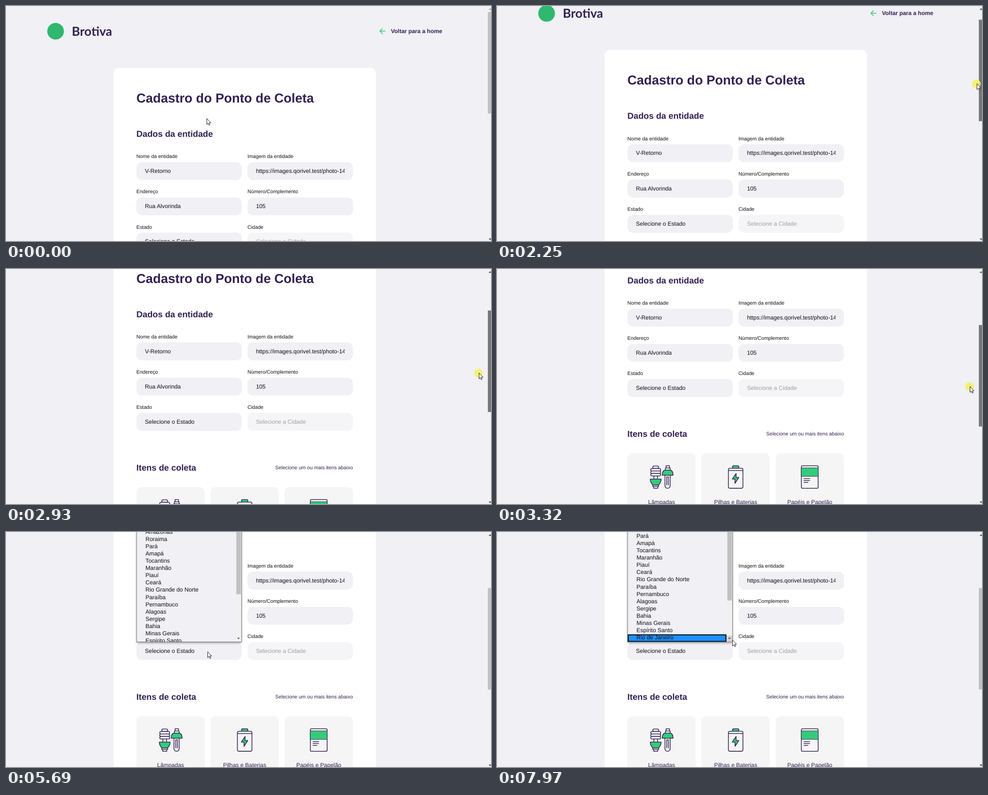
Recreate the animation shown at these times as an HTML page. Size 1076x521 px, loop 8000 ms.

```html
<!DOCTYPE html>
<html lang="pt-BR">
<head>
<meta charset="utf-8">
<title>Cadastro</title>
<style>
  html, body { margin: 0; width: 100%; height: 100%; overflow: hidden; background: #f0f0f5; }
  svg { display: block; width: 1076px; height: 521px; }
  text { font: 12.75px "Liberation Sans", Arial, sans-serif; fill: #111; text-rendering: geometricPrecision; }
  .brand { font: 700 27.6px Lato, sans-serif; fill: #322153; }
  .title { font-size: 28.7px; font-weight: 700; fill: #322153; }
  .section { font-size: 19.1px; font-weight: 700; fill: #322153; }
  .back { font-weight: 700; fill: #322153; }
  .label { font-size: 11.16px; }
  .hint { font-size: 11.16px; fill: #322153; text-anchor: end; }
  .item { fill: #322153; text-anchor: middle; }
  .off { fill: #9f9fa2; }
  .icon { fill: #f5f5f5; stroke: #322153; stroke-width: 1.6; stroke-linejoin: round; stroke-linecap: round; }
  .icon .g { fill: #34cb79; }
  #popup { filter: drop-shadow(0 2px 2px rgba(0, 0, 0, .35)); }
</style>
</head>
<body>
<svg viewBox="0 0 1076 521">
  <defs>
    <clipPath id="urlClip"><rect x="550" y="340" width="201" height="50"/></clipPath>
    <clipPath id="listClip"><rect x="290" width="220" height="243.5"/></clipPath>
  </defs>
  <rect width="1076" height="521" fill="#f0f0f5"/>

  <g id="page">
    <circle cx="110" cy="56" r="18.5" fill="#2fb86e"/>
    <text class="brand" x="146" y="65.7">Brotiva</text>
    <path d="M841 55.7H829.5m5.7-5.7l-5.7 5.7l5.7 5.7" fill="none" stroke="#34cb79" stroke-width="1.7" stroke-linecap="round" stroke-linejoin="round"/>
    <text class="back" x="854" y="59.8">Voltar para a home</text>
    <rect x="238.7" y="137" width="582" height="1000" rx="12.5" fill="#fff"/>
    <text class="title" x="289.3" y="214">Cadastro do Ponto de Coleta</text>
    <text class="section" x="289.3" y="290">Dados da entidade</text>
    <g id="fields"></g>
    <text class="section" x="289.3" y="630">Itens de coleta</text>
    <text class="hint" x="769.7" y="627.6">Selecione um ou mais itens abaixo</text>
    <g id="items"></g>
  </g>

  <rect x="1069" width="7" height="521" fill="#f1f1f1"/>
  <path id="up" d="M1070.5 8.5l3.5-3.5l3.5 3.5z"/>
  <path d="M1070.5 515.5l3.5 3.5l3.5-3.5z" fill="#505050"/>
  <rect id="thumb" x="1069" width="7" height="225"/>

  <g id="popup">
    <rect x="289.9" y="-6" width="232.6" height="249.7" fill="#f0f0f5" stroke="#767676"/>
    <g id="list" clip-path="url(#listClip)"></g>
    <rect x="510" width="12" height="243" fill="#f1f1f1"/>
    <rect id="listThumb" x="511" width="10" fill="#c1c1c1"/>
    <rect id="listDown" x="509.5" y="230" width="12.5" height="13.2" fill="#d2d2d2"/>
    <path d="M512.7 234.5h6l-3 3.3z" fill="#505050"/>
  </g>

  <g id="cursor">
    <circle id="press" cx="-.7" cy=".7" r="9.5" fill="#f7ee5e" opacity=".85"/>
    <path d="M.5 .5V13.6L3.4 10.8L5.4 15.4L7.4 14.5L5.4 10H9.4Z" fill="#fff" stroke="#111"/>
  </g>
</svg>
<script>
const LOOP = 8000, TICK = 77, ROW = 16.08;
const LEFT = 289.3, INSET = 19;
const $ = id => document.getElementById(id);
const set = (id, name, value) => $(id).setAttribute(name, value);
const show = (id, on) => { $(id).style.display = on ? '' : 'none'; };

const fields = [
  ['Nome da entidade', 'V-Retorno'], ['Imagem da entidade', 'https://images.qorivel.test/photo-1480'],
  ['Endereço', 'Rua Alvorinda'], ['Número/Complemento', '105'],
  ['Estado', 'Selecione o Estado'], ['Cidade', 'Selecione a Cidade']
];
$('fields').innerHTML = fields.map(([label, value], i) => {
  const off = value.endsWith('Cidade'), clip = value.startsWith('http');
  return `<g transform="translate(${LEFT + i % 2 * 246.4} ${337.2 + (i >> 1) * 78.2})">
    <text class="label">${label}</text>
    <rect y="9" width="234" height="39.7" rx="12.5" fill="${off ? '#f5f5f7' : '#f0f0f5'}"/></g>
    <g${clip ? ' clip-path="url(#urlClip)"' : ''}><text${off ? ' class="off"' : ''}
      x="${LEFT + INSET + i % 2 * 246.4}" y="${370 + (i >> 1) * 78.2}">${value}</text></g>`;
}).join('');

// Icons are drawn around a centre line at x = 0, with their top at y = 0.
const bar = (width, y) => `<rect x="${-13 - width / 2}" y="${y}" width="${width}" height="5.5" rx="2.7"/>`;
const items = {
  'Lâmpadas': bar(13, .5) + [6, 11.5, 17].map(y => bar(22, y)).join('') + `
    <path d="M-17 22.5v7m8 0v-7M-19.5 42.5h13v3.5h-13zm2 3.5h9v4h-9z"/>
    <path class="g" d="M-25 29.5h24q0 8-6 13h-12q-6-5-6-13z"/>
    <path d="M8.5 9.5v-4.5h10.5v4.5M10 5v-5h7.5v5M7.5 20.5v23.5a5.8 6 0 0 0 11.6 0v-23.5m-7.6 22v-18h3.7v18"/>
    <path class="g" d="M1.5 21q0-11.5 7.5-11.5h9q7.5 0 7.5 11.5z"/>`,
  'Pilhas e Baterias': `
    <rect class="g" x="-7" width="14" height="9" rx="2.5"/>
    <rect x="-16.1" y="5.5" width="32.2" height="44.3" rx="3"/>
    <path d="M-16 10.5h32"/>
    <path class="g" d="M1 17l-8.5 12.5h6v9.5l8.5-13h-6z"/>`,
  'Papéis e Papelão': `
    <rect x="-18.6" width="37.2" height="50" rx="2.5"/>
    <path class="g" d="M-18.6 4.7h37.2v18.8h-37.2z" stroke-width="1"/>
    <path d="M-13 28.5h13m-13 4.2h13m-13 4.2h9" stroke-width="1.4"/>`
};
$('items').innerHTML = Object.entries(items).map(([name, icon], i) =>
  `<g transform="translate(${LEFT + 75.8 + i * 164.4} 667)">
    <rect x="-75.8" width="151.6" height="143" rx="11" fill="#f5f5f5"/>
    <g class="icon" transform="translate(0 27.8)">${icon}</g>
    <text class="item" y="112.2">${name}</text></g>`).join('');

const states = ['Amazonas', 'Roraima', 'Pará', 'Amapá', 'Tocantins', 'Maranhão', 'Piauí', 'Ceará',
  'Rio Grande do Norte', 'Paraíba', 'Pernambuco', 'Alagoas', 'Sergipe', 'Bahia', 'Minas Gerais',
  'Espírito Santo', 'Rio de Janeiro'];
const lastRow = states.length - 1;
$('list').innerHTML = '<rect id="hover" x="291" width="217" height="14.6" fill="#1e90ff" stroke="#000" stroke-width="2"/>'
  + `<g id="rows">${states.map((s, i) => `<text x="309.5" y="${3.8 + i * ROW}">${s}</text>`).join('')}</g>`;

// Pointer moves: start, end, x, y and, while dragging, the page scroll reached.
const moves = [
  [300, 450, 445, 251], [600, 680, 417, 248], [760, 1380, 932, 176], [1460, 1850, 1069, 155],
  [2080, 2542, 1058, 194, 92.5], [2619, 2930, 1049, 230, 183.5], [3008, 3320, 1049, 260, 258.5],
  [3570, 4040, 619, 268], [4190, 4270, 610, 266], [4420, 4650, 585, 263], [4800, 4800, 595, 266],
  [4980, 5280, 447, 265], [5920, 6400, 458, 229], [6630, 6780, 462, 222], [7100, 7870, 528, 237],
  [7970, 7970, 522, 239]
];

// The screen refreshes in even ticks; the first one already shows movement.
function progress(t, start, end) {
  if (t >= end) return 1;
  const n = Math.round((end - start) / TICK);
  return (Math.floor((t - start) / (end - start) * n) + 1) / (n + 1);
}

function pose(t) {
  let x = 445, y = 249, top = 0;
  for (const [start, end, toX, toY, toTop = top] of moves) {
    if (t < start) break;
    const p = progress(t, start, end);
    x += (toX - x) * p;
    y += (toY - y) * p;
    top += (toTop - top) * p;
  }
  return { x, y, top };
}

function draw(t) {
  const { x, y, top } = pose(t);
  const pressed = t >= 2080 && t < 3570;
  const hovered = !pressed && x > 1060;
  set('page', 'transform', `translate(0 ${-top})`);
  set('thumb', 'y', 13.3 + top * .429);
  set('thumb', 'fill', pressed ? '#787878' : hovered ? '#a8a8a8' : '#c1c1c1');
  set('up', 'fill', top ? '#505050' : '#a3a3a3');
  set('cursor', 'transform', `translate(${x} ${y})`);
  show('press', pressed);

  // Entering the list brings its last row fully into view.
  const open = t >= 5600, inside = open && y < 243;
  const offset = inside ? 23 : 0;
  const row = Math.min(lastRow, Math.floor((y + offset + 7.3) / ROW));
  show('popup', open);
  show('hover', inside);
  show('listDown', inside && x > 509 && x <= 522 && y > 230);
  set('rows', 'transform', `translate(0 ${-offset})`);
  set('hover', 'y', row * ROW - 6.3 - offset);
  set('listThumb', 'height', 138 + offset * .6);
}

const start = performance.now();
function tick() {
  draw((performance.now() - start) % LOOP);
  requestAnimationFrame(tick);
}
tick();
</script>
</body>
</html>
```
